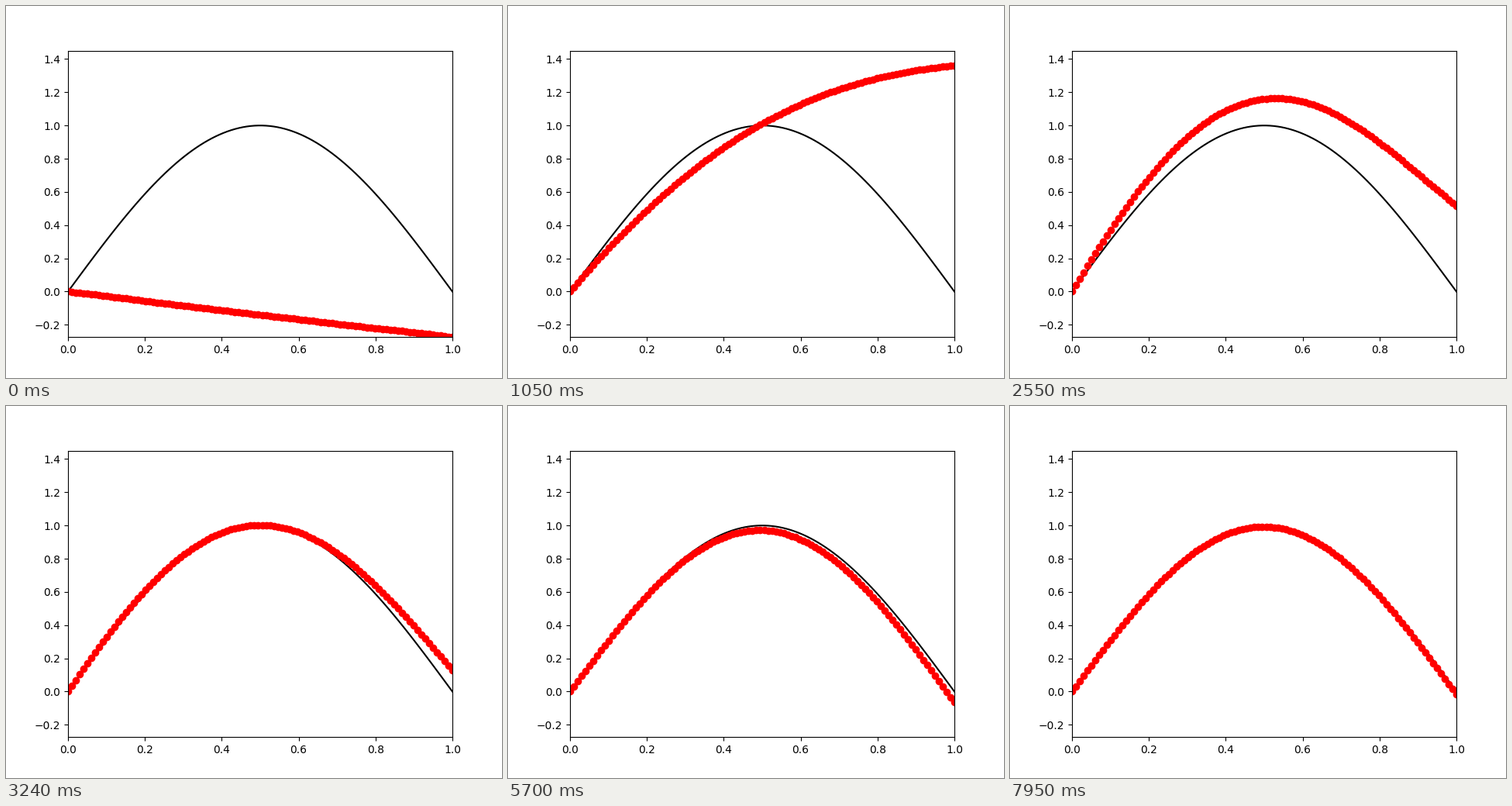
A matplotlib script for the animation above (8 s loop, 640 by 480 pixels).

```python
import numpy as np
import matplotlib.pyplot as plt
from matplotlib.animation import FuncAnimation

LOOP, TICK, STEP = 8000, 20, 30

x = np.linspace(0, 1, 100)
quarters = np.arange(1, 5) / 4


def exact(x):
    return np.sin(np.pi * x)


def drift(x):
    """Shape of the small error left while the fit settles."""
    return x - 0.05 * np.sin(1.5 * np.pi * x)


# Key poses: time in ms -> height of the fit at each quarter of the axis
poses = {
    0: -0.285 * quarters + 0.011 * quarters ** 2,
    810: [0.43, 0.82, 1.11, 1.335],
    1050: [0.595, 1.012, 1.254, 1.36],
    1380: [0.78, 1.25, 1.435, 1.41],
    1830: [0.884, 1.277, 1.264, 1.015],
    3240: [0.724, 1.002, 0.742, 0.129],
}
settling = {4060: 0.178, 4440: 0.113, 4860: 0.065, 5700: 0.062, 7950: 0.017}
for t, size in settling.items():
    poses[t] = exact(quarters) - size * drift(quarters)

times = np.array(list(poses))
heights = np.array(list(poses.values()))


def tangents(t, v):
    """Slopes that never overshoot the poses."""
    d = np.diff(v, axis=0) / np.diff(t)[:, None]
    a, b = d[:-1], d[1:]
    same = a * b > 0
    inner = np.where(same, 2 * a * b / np.where(same, a + b, 1), 0)
    return np.vstack([d[:1], inner, d[-1:]])


slopes = tangents(times, heights)


def pose(t):
    i = min(np.searchsorted(times, t, side="right") - 1, len(times) - 2)
    h = times[i + 1] - times[i]
    s = (t - times[i]) / h
    return ((1 + 2 * s) * (1 - s) ** 2 * heights[i]
            + s * (1 - s) ** 2 * h * slopes[i]
            + s * s * (3 - 2 * s) * heights[i + 1]
            + s * s * (s - 1) * h * slopes[i + 1])


def fit(t):
    # A smooth error that vanishes at x = 0
    error = (pose(t) - exact(quarters)) / quarters
    return exact(x) + x * np.polyval(np.polyfit(quarters, error, 3), x)


fig, ax = plt.subplots(figsize=(6.4, 4.8), dpi=100)
ax.plot(x, exact(x), "k-")
dots, = ax.plot(x, fit(0), "ro")
ax.set_xlim(0, 1)
ax.set_ylim(-0.274, 1.4508)


def update(i):
    # The picture changes every STEP ms; read it mid-tick
    n = min((i * TICK + TICK // 2) // STEP, LOOP // STEP - 1)
    dots.set_ydata(fit(n * STEP))
    return dots,


anim = FuncAnimation(fig, update, frames=LOOP // TICK, interval=TICK,
                     repeat=True, repeat_delay=0)
plt.show()
```
